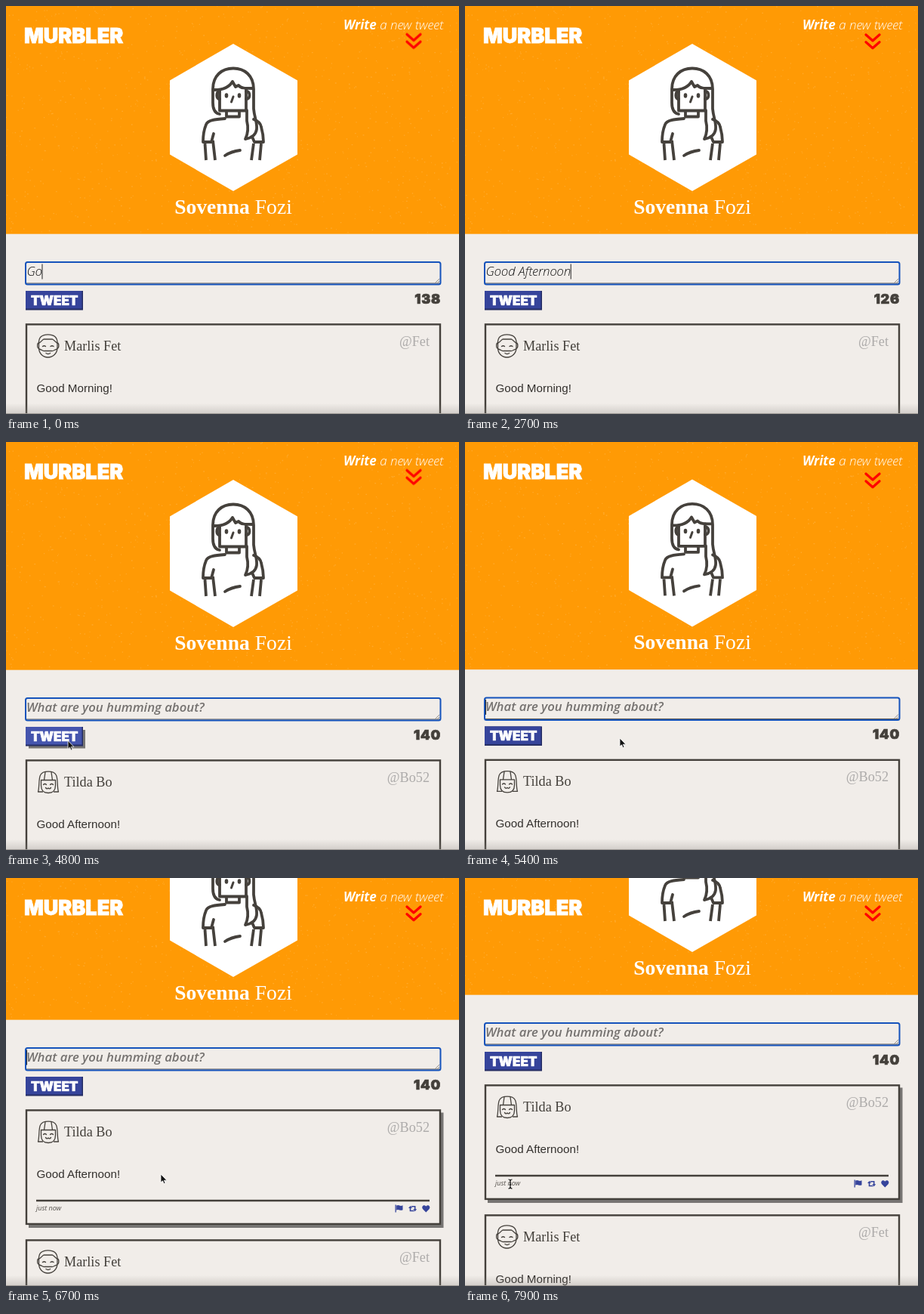
Animation, 600 px wide and 540 px high, one loop 8000 ms. Source, as an HTML page:

```html
<!DOCTYPE html>
<html lang="en">
<head>
<meta charset="utf-8">
<title>Murbler</title>
<style>
  html, body { margin: 0; width: 100%; height: 100%; overflow: hidden; background: #f1ede9; }
  svg { display: block; width: 600px; height: 540px; }

  .logo { font: 900 27px Inter, sans-serif; fill: #fff; stroke: #fff; stroke-width: .8; }
  .blocky { font: 900 17px Inter, sans-serif; stroke-width: .7; }
  #count { font-size: 18px; letter-spacing: .8px; }
  .hint { font: italic 300 17px "Open Sans", sans-serif; fill: #fff; }
  .hint tspan, .profile tspan { font-weight: 700; }
  .profile { font: 27.6px "Liberation Serif", serif; fill: #fff; }
  .field { font: italic 300 16.8px "Open Sans", sans-serif; fill: #111; }
  .prompt { font: italic 600 16.75px "Open Sans", sans-serif; fill: #757270; }
  .name { font: 18.2px "Liberation Serif", serif; fill: #44403b; }
  .handle { font: 18.2px "Liberation Serif", serif; fill: #adabaa; text-anchor: end; }
  .body { font: 15.2px "Liberation Sans", sans-serif; fill: #33302d; }
  .age { font: italic 9px "Open Sans", sans-serif; fill: #55514c; }

  .frame { fill: #f1ede9; stroke: #44403b; stroke-width: 2.4; }
  .line { fill: none; stroke: #45413c; stroke-linecap: round; stroke-linejoin: round; }
  .shadow { fill: #777573; }
  .ink { fill: #36449b; }

  #page { animation: scroll 8s linear infinite; }
  @keyframes scroll {
    0%, 66.25% { transform: translateY(0); }
    68.5% { transform: translateY(-1px); }
    71.25% { transform: translateY(-108px); }
    74%, 84% { transform: translateY(-114px); animation-timing-function: ease-in-out; }
    90%, 100% { transform: translateY(-147px); }
  }

  #thumb { animation: thumb 8s linear infinite; }
  @keyframes thumb {
    0%, 67.5% { transform: translateY(0); opacity: 0; }
    68.5% { opacity: 1; }
    71.25% { transform: translateY(45px); }
    74% { transform: translateY(48px); }
    78% { opacity: 1; }
    81%, 84% { transform: translateY(48px); opacity: 0; }
    85.5% { opacity: 1; }
    90% { transform: translateY(62px); }
    94% { opacity: 1; }
    97%, 100% { transform: translateY(62px); opacity: 0; }
  }

  #chevrons { animation: bob .2s ease-in-out -.04s infinite alternate; }
  @keyframes bob { to { transform: translateY(5.5px); } }

  #pointer { animation: move 8s ease-in-out infinite; }
  @keyframes move {
    0%, 39% { transform: translate(150px, 420px); }
    46%, 58.75% { transform: translate(74.5px, 395.5px); }
    66.25%, 90% { transform: translate(205px, 392px); }
    97%, 100% { transform: translate(60px, 405px); }
  }
</style>
</head>
<body>
<svg viewBox="0 0 600 540">
  <defs>
    <linearGradient id="fade" x2="0" y2="1">
      <stop stop-color="#8a8580" stop-opacity="0"/>
      <stop offset="1" stop-color="#8a8580" stop-opacity=".28"/>
    </linearGradient>
  </defs>

  <g id="page">
    <rect width="600" height="301.7" fill="#ff9a05"/>
    <path id="specks" stroke="#fff" stroke-opacity=".15" stroke-width="1.3" fill="none"/>

    <path d="M301 50L386 98.5V196.5L301 245L217 196.5V98.5Z" fill="#fff"/>
    <g class="line" stroke-width="3.8">
      <path d="M283 143C277 142 274 137 274 128V110C274 92 286 82.500 301 82.500S328 92 328 110V136C329 148 333 154 332 163C331 171 324 175 317 176C321 168 321 160 319 152V138"/>
      <path d="M283 111V138.500H318V109"/>
      <path d="M276 111C287 111 296 107 300 100L304 107L308 105C311 109 317 109 326 109"/>
      <path d="M283 113C278 112 278 124 283 123M318 113C324 112 324 124 318 123"/>
      <path d="M301 120L298.500 127" stroke-width="3"/>
      <path d="M292 140V146.500H309V140"/>
      <path d="M290 149C277 150 267 151 265 157C262 164 261 172 261 180H272L275 169"/>
      <path d="M328 150C334 152 337 155 338 160C340 167 341 174 341 180H329L326 173"/>
      <path d="M263.500 182L265 204M274 178L277 204M338 182L336 204M328 182L325 204" stroke-linecap="butt"/>
      <path d="M290 198C296 194 302 192 310 191"/>
    </g>
    <g fill="#45413c"><ellipse cx="292" cy="118.500" rx="2.300" ry="3.300"/><ellipse cx="309" cy="118.500" rx="2.300" ry="3.300"/></g>
    <text class="profile" x="301" y="274.500" text-anchor="middle"><tspan>Sovenna</tspan> Fozi</text>

    <rect x="26" y="339" width="549.500" height="29.500" rx="2.500" fill="#f1ede9"/>
    <path d="M27 367H574.500" stroke="#55514c"/>
    <rect x="26" y="339" width="549.500" height="29.500" rx="2.500" fill="none" stroke="#1553bb" stroke-width="2"/>
    <path d="M568.500 366.500L574 361M571.500 366.500L574 364" stroke="#77736f" stroke-width=".8"/>
    <text class="prompt" id="prompt" x="27" y="356.800">What are you humming about?</text>
    <text class="field" id="field" x="27.500" y="357"></text>
    <rect id="caret" y="341.500" width="1" height="20" fill="#222"/>

    <rect class="shadow" id="lift" x="30" y="381" width="75" height="24.500"/>
    <rect x="26" y="377" width="76" height="25.500" fill="#252d63"/>
    <rect class="ink" id="button" x="26" y="377" width="74.500" height="23.500"/>
    <text class="blocky" x="64.200" y="395.700" text-anchor="middle" fill="#fff" stroke="#fff">TWEET</text>
    <text class="blocky" id="count" x="576" y="393.700" text-anchor="end" fill="#44403b" stroke="#44403b"></text>

    <g id="fresh">
      <rect class="shadow" id="cardShadow" x="30" y="424.500" width="549.500" height="152.500"/>
      <rect class="frame" x="27" y="421.400" width="548" height="150.500"/>
      <g class="line" stroke-width="1.3">
        <path d="M48.500 463H42.500C44.500 457 43 446 45.500 441C48.500 434.500 63.500 434.500 66.500 441C69 446 67.500 457 69.500 463H63.500"/>
        <path d="M46.500 447.500V454.500C46.500 461 50 464.500 56 464.500S65.500 461 65.500 454.500V447.500M46.500 447.500H65.500M52 437L50.500 447.500M60 437L61.500 447.500"/>
        <path d="M49.500 453.500q2 -2 4 0M58.500 453.500q2 -2 4 0M52.500 457.500q1.800 2.500 3.500 .5q1.700 2 3.500 -.5"/>
      </g>
      <text class="name" x="77" y="456">Tilda Bo</text>
      <text class="handle" x="561" y="450">@Bo52</text>
      <text class="body" x="40.500" y="511">Good Afternoon!</text>
      <path d="M40 541H561" stroke="#44403b" stroke-width="2.300"/>
      <text class="age" x="40" y="554">just now</text>
      <g class="ink">
        <path d="M515.500 546.500h1.300v10h-1.300zM517.200 547.500q2 -1 4 0t4.300 -.3v6q-2 1 -4.200 .2t-4.100 .1z"/>
        <path d="M533 551l2.500 -3l2.500 3h-1.700v2.700h3.400l1.400 1.500h-6.400v-4.200zM544.200 552.200l-2.500 3l-2.500 -3h1.700v-2.700h-3.400l-1.400 -1.500h6.400v4.200z"/>
        <path d="M556.300 556.500l-4.200 -4.300c-2.600 -3 1.200 -7 4.200 -3.600c3 -3.400 6.800 .6 4.200 3.600z"/>
      </g>
    </g>

    <g id="older">
      <rect class="frame" x="27" y="421.400" width="548" height="150.500"/>
      <g class="line" stroke-width="1.300">
        <path d="M43.500 447C43 438 48 434.800 55.500 434.800S68.500 438 68 447V452C68 460 62 465 55.500 465S43.500 460 43.500 452Z"/>
        <path d="M43.500 446C41 446 41 453 43.500 453M68 446C70.500 446 70.500 453 68 453"/>
        <path d="M44 446C47 444 48 442 50 441H61.500C63.500 442 65 444 67.500 446M44 454C48 455 49 457 51 456.500H60.500C63 457 64 455 67.500 454"/>
        <path d="M48.500 450.500q2 -1.500 4 0M59 450.500q2 -1.500 4 0M53 459.500q2.800 2 5.600 0"/>
      </g>
      <text class="name" x="77" y="456">Marlis Fet</text>
      <text class="handle" x="561" y="450">@Fet</text>
      <text class="body" x="40.500" y="511">Good Morning!</text>
    </g>
  </g>

  <text class="logo" x="24" y="49">MURBLER</text>
  <text class="hint" x="579" y="31" text-anchor="end"><tspan>Write</tspan> a new tweet</text>
  <path id="chevrons" d="M531 37L540 45L549 37M531 46.800L540 54.800L549 46.800" fill="none" stroke="#f00" stroke-width="3.200" stroke-linecap="round" stroke-linejoin="round"/>

  <rect id="thumb" x="599" width="1" height="55" fill="#5a4a38"/>
  <rect y="526" width="600" height="13" fill="url(#fade)"/>
  <rect y="539" width="600" height="1" fill="#9b9793"/>

  <g id="pointer">
    <path id="arrow" d="M0 0V11L2.500 8.800L4.200 12.600L6 11.800L4.400 8.200H8Z" fill="#111" stroke="#fff" stroke-width=".8"/>
    <path id="beam" d="M-2.500 -6Q0 -6 0 -4Q0 -6 2.500 -6M0 -4V4M-2.500 6Q0 6 0 4Q0 6 2.500 6M-1.500 1H1.500" fill="none" stroke="#111" stroke-width="1.200"/>
  </g>
</svg>
<script>
  const LOOP = 8000, KEY = 215, TYPED = 2900, POST = 4600, LIMIT = 140;
  const message = 'Good Afternoon!';
  const el = id => document.getElementById(id);
  const show = (id, on) => el(id).setAttribute('visibility', on ? 'visible' : 'hidden');
  const between = (t, a, b) => t >= a && t < b;

  let seed = 7;
  const random = () => (seed = seed * 16807 % 2147483647) / 2147483647;
  el('specks').setAttribute('d', Array.from({ length: 1100 }, () =>
    `M${(random() * 600).toFixed(1)} ${(random() * 300).toFixed(1)}h${(0.5 + random() * 1.3).toFixed(1)}`).join(''));

  function caretOn(t) {
    if (t < TYPED) return true;
    const since = t - (t < POST ? TYPED : POST - 350);
    return since % 1000 < 500;
  }

  function draw(t) {
    const posted = t >= POST;
    const text = posted ? '' : message.slice(0, 2 + Math.floor(t / KEY));
    const hover = between(t, 3650, 4850);
    const overText = t >= 7550;

    el('field').textContent = text;
    el('count').textContent = LIMIT - text.length;
    el('caret').setAttribute('x', 27 + (text ? el('field').getComputedTextLength() : 0));
    el('older').setAttribute('transform', `translate(0 ${posted ? 172 : 0})`);
    el('fresh').setAttribute('display', posted ? 'inline' : 'none');
    el('button').style.fill = hover ? '#4555ae' : '';

    show('prompt', posted);
    show('caret', caretOn(t));
    show('lift', hover);
    show('cardShadow', t >= 6100);
    show('arrow', t >= 3150 && !overText);
    show('beam', overText);
  }

  let start;
  function tick(now) {
    start ??= now;
    draw((now - start) % LOOP);
    requestAnimationFrame(tick);
  }
  draw(0);
  requestAnimationFrame(tick);
</script>
</body>
</html>
```
